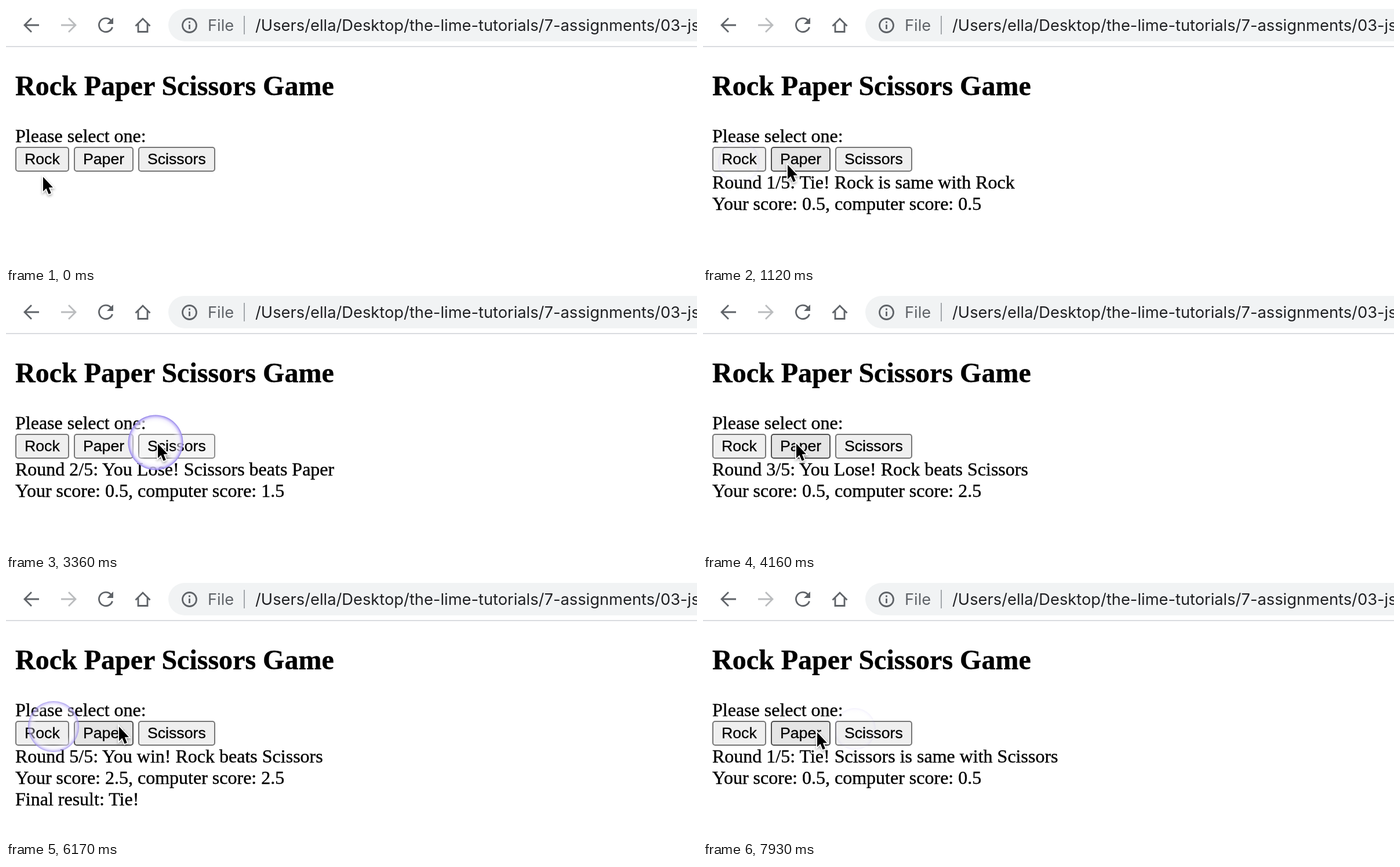
An HTML page that plays this animation: 1192 px wide and 447 px high, repeating every 8 s.

```html
<!DOCTYPE html>
<html lang="en">
<head>
<meta charset="utf-8">
<title>Rock Paper Scissors Game</title>
<style>
  html, body { margin: 0; width: 100%; height: 100%; overflow: hidden; background: #fff; }
  svg { display: block; width: 100%; height: 100%; }
  .icon { fill: none; stroke: #5f6368; stroke-width: 2.8; }
  .address { font: 27.3px Inter, Roboto, sans-serif; fill: #202124; }
  .page, .title { stroke: #000; stroke-width: .4; }
  .page { font: 32px "Liberation Serif", "Times New Roman", serif; }
  .title { font: bold 48px "Liberation Serif", "Times New Roman", serif; }
  .button text { font: 26.67px "Liberation Sans", Arial, sans-serif; stroke: #000; stroke-width: .3; }
  .button rect { fill: #efefef; stroke: #767676; stroke-width: 2; }
  .button.hover rect { fill: #e5e5e5; stroke: #4f4f4f; }
  .button.active rect { fill: #f5f5f5; stroke: #8d8d8d; }
  #cursor { filter: drop-shadow(0 2px 2px rgba(0, 0, 0, .35)); }
</style>
</head>
<body>
<svg viewBox="0 0 1192 447">
  <defs>
    <radialGradient id="glow">
      <stop offset=".7" stop-color="#fff" stop-opacity="0"/>
      <stop offset=".86" stop-color="#eeeafd" stop-opacity=".6"/>
      <stop offset=".94" stop-color="#c3b7f7" stop-opacity=".85"/>
      <stop offset="1" stop-color="#8f7fe8"/>
    </radialGradient>
  </defs>

  <rect y="69" width="1192" height="2" fill="#dadce0"/>
  <rect x="280" y="5" width="960" height="56" rx="28" fill="#f1f3f4"/>
  <g class="icon">
    <path d="M57 33H33M44 21L32 33L44 45"/>
    <path d="M95 33H119M108 21L120 33L108 45" stroke="#babcbe"/>
    <path d="M181 25A11.8 11.8 0 1 0 183.5 36.5"/>
    <path d="M185 20V31H174Z" fill="#5f6368" stroke="none"/>
    <path d="M223.5 34.5L236 22L248.5 34.5M228 31V44.5H244V31"/>
    <circle cx="316.5" cy="33.5" r="12"/>
    <path d="M316.5 32V40M316.5 26.5V29.5"/>
  </g>
  <text class="address" x="348" y="43" style="fill:#5f6368">File</text>
  <rect x="410" y="17" width="2" height="32" fill="#a3a7ab"/>
  <text class="address" x="430" y="43">/Users/ella/Desktop/the-lime-tutorials/7-assignments/03-js</text>

  <text class="title" x="16" y="154">Rock Paper Scissors Game</text>
  <g class="page">
    <text x="16" y="235">Please select one:</text>
    <text id="round" x="16" y="315"></text>
    <text id="score" x="16" y="352"></text>
    <text id="final" x="16" y="389"></text>
  </g>
  <g id="buttons"></g>
  <circle id="ring" fill="url(#glow)"/>
  <path id="cursor" d="M0 0V25L5.4 19.8L9.6 29.8L13.8 28L9.8 18.2H17Z"
        stroke="#fff" stroke-width="3.5" paint-order="stroke"/>
</svg>
<script>
const LOOP = 8000, STEP = 80, FADE = 640;
const RING_FULL = 47.5, RING_SHRINK = 13;
const el = id => document.getElementById(id);

const buttons = [["Rock", 16, 93], ["Paper", 117, 103], ["Scissors", 228, 133]].map(([label, x, width]) => {
  const node = document.createElementNS("http://www.w3.org/2000/svg", "g");
  node.innerHTML = `<rect x="${x + 1}" y="244" width="${width - 2}" height="41" rx="4"/>
    <text x="${x + 16}" y="273">${label}</text>`;
  el("buttons").append(node);
  return { node, x, width };
});

// Each click: press and release time, ring centre, resulting lines.
const clicks = [
  { down: 400, up: 560, x: 62, y: 270, round: "1/5: Tie! Rock is same with Rock", you: 0.5, computer: 0.5 },
  { down: 1680, up: 1850, x: 165, y: 271, round: "2/5: You Lose! Scissors beats Paper", you: 0.5, computer: 1.5 },
  { down: 3270, up: 3440, x: 258, y: 258, round: "3/5: You Lose! Rock beats Scissors", you: 0.5, computer: 2.5 },
  { down: 4720, up: 4890, x: 160, y: 259, round: "4/5: You win! Paper beats Rock", you: 1.5, computer: 2.5 },
  { down: 5830, up: 5990, x: 82, y: 253, round: "5/5: You win! Rock beats Scissors", you: 2.5, computer: 2.5, final: "Final result: Tie!" },
  { down: 7180, up: 7350, x: 262, y: 257, round: "1/5: Tie! Scissors is same with Scissors", you: 0.5, computer: 0.5 }
];

// Pointer tip as [time, x, y].
const path = [
  [160, 63, 294], [400, 62, 270], [720, 62, 270], [940, 98, 282], [1120, 145, 273], [1440, 165, 270],
  [2640, 165, 270], [3200, 259, 258], [3360, 261, 259], [3440, 258, 258], [3520, 205, 262], [3720, 146, 264],
  [4160, 160, 259], [4720, 160, 259], [5040, 164, 261], [5120, 164, 261], [5520, 82, 253],
  [5990, 82, 253], [6160, 194, 252], [6560, 200, 256], [7040, 262, 257], [7440, 262, 257], [7840, 196, 262]
];

function pointerAt(t) {
  const next = path.findIndex(key => key[0] > t);
  if (next < 0) return path[path.length - 1].slice(1);
  if (next === 0) return path[0].slice(1);
  const [t0, x0, y0] = path[next - 1], [t1, x1, y1] = path[next];
  const p = (t - t0) / (t1 - t0), eased = p * p * (3 - 2 * p);
  return [x0 + (x1 - x0) * eased, y0 + (y1 - y0) * eased];
}

function drawText(t) {
  const result = clicks.filter(click => click.up <= t).pop();
  el("round").textContent = result ? `Round ${result.round}` : "";
  el("score").textContent = result
    ? `Your score: ${result.you.toFixed(1)}, computer score: ${result.computer.toFixed(1)}` : "";
  el("final").textContent = result?.final ?? "";
}

function drawRing(t) {
  const click = clicks.find(c => t >= c.down && t < c.up + FADE);
  const ring = el("ring");
  if (!click) return ring.setAttribute("opacity", 0);
  const fade = Math.max(0, (t - click.up) / FADE);
  ring.setAttribute("cx", click.x);
  ring.setAttribute("cy", click.y);
  ring.setAttribute("r", RING_FULL - RING_SHRINK * fade);
  ring.setAttribute("opacity", 1 - fade);
}

function drawPointer(t) {
  const [x, y] = pointerAt(t);
  const pressed = clicks.some(c => t >= c.down && t < c.up);
  for (const { node, x: left, width } of buttons) {
    const over = x >= left && x < left + width && y >= 243 && y < 286;
    node.setAttribute("class", `button ${over ? (pressed ? "active" : "hover") : ""}`);
  }
  el("cursor").setAttribute("transform", `translate(${x + 1} ${y + 1})`);
}

function draw(now) {
  const t = Math.floor((now % LOOP) / STEP) * STEP;
  drawText(t);
  drawRing(t);
  drawPointer(t);
}

const start = performance.now();
function tick() {
  draw(performance.now() - start);
  requestAnimationFrame(tick);
}
tick();
</script>
</body>
</html>
```
